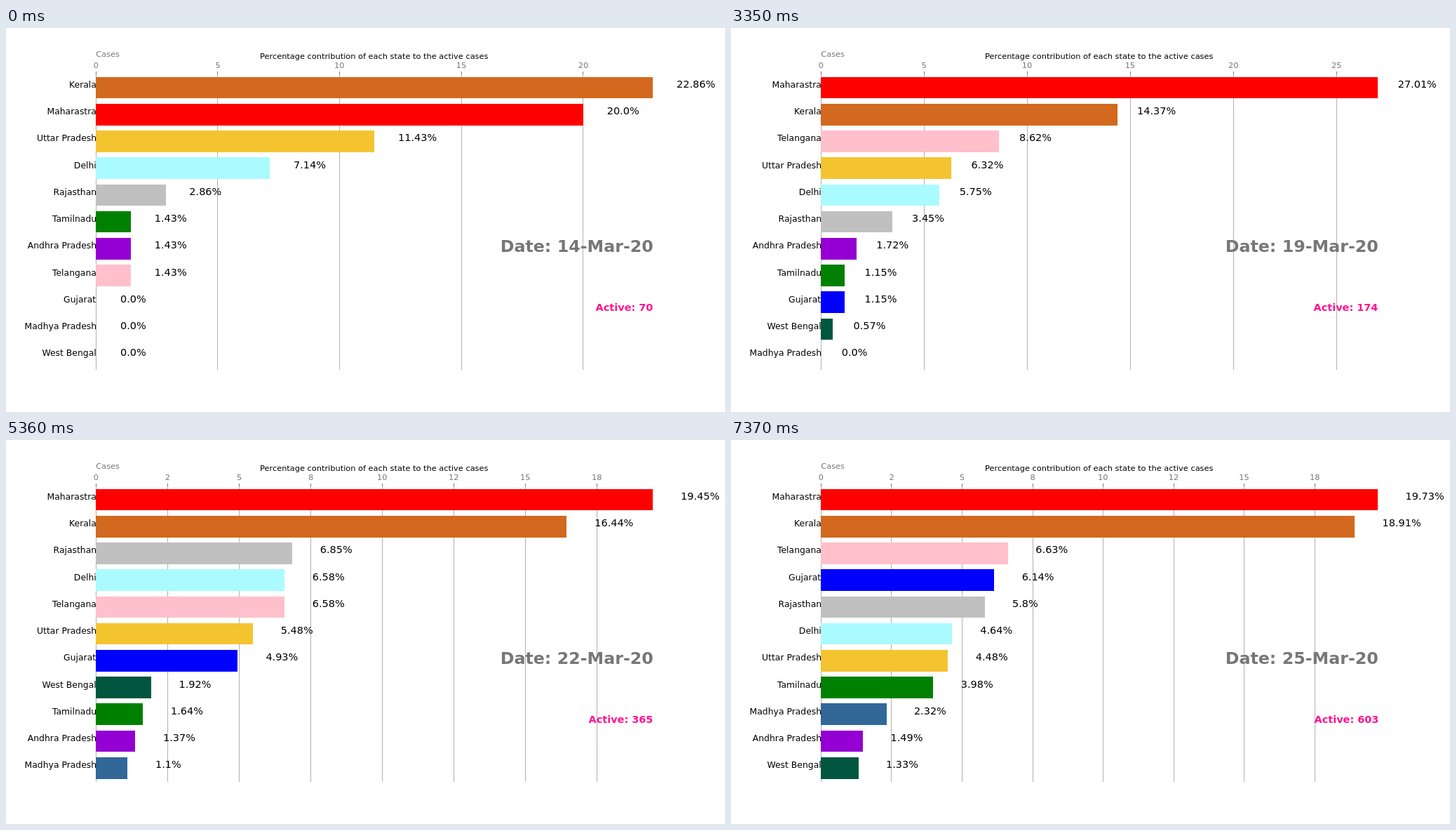
Write an HTML page with a canvas that moves like this. It is 1025 px wide and 547 px high and loops after 8 s.

```html
<!DOCTYPE html>
<html lang="en">
<head>
<meta charset="utf-8">
<title>Active cases by state</title>
<style>
  html, body { margin: 0; width: 100%; height: 100%; overflow: hidden; background: #fff; }
  canvas { display: block; }
</style>
</head>
<body>
<canvas id="chart" width="1025" height="547"></canvas>
<script>
const ctx = document.getElementById('chart').getContext('2d');

const DAY_MS = 670, LOOP_MS = 8000, FIRST_DAY = 14;
const LEFT = 128.3, RIGHT = 922.3, TOP = 65.7, BOTTOM = 486.9;
const FIRST_ROW = 85, ROW_STEP = 38.22, BAR_HEIGHT = 30.6;
const GREY = '#777777';

// Active cases per day, listed in the ranking order of the first day.
const states = [
  ['Kerala', '#d2691e', [16, 21, 20, 24, 24, 25, 25, 49, 60, 92, 91, 114]],
  ['Maharastra', '#ff0000', [14, 32, 32, 40, 41, 47, 49, 63, 71, 95, 97, 119]],
  ['Uttar Pradesh', '#f4c430', [8, 9, 9, 10, 11, 11, 14, 19, 20, 23, 24, 27]],
  ['Delhi', '#aafbff', [5, 4, 4, 5, 7, 10, 14, 21, 24, 24, 23, 28]],
  ['Rajasthan', '#c0c0c0', [2, 1, 1, 1, 1, 6, 14, 21, 25, 29, 29, 35]],
  ['Tamilnadu', '#008000', [1, 1, 0, 0, 0, 2, 2, 5, 6, 11, 14, 24]],
  ['Andhra Pradesh', '#9400d3', [1, 1, 1, 1, 1, 3, 3, 5, 5, 7, 8, 9]],
  ['Telangana', '#ffc0cb', [1, 2, 2, 4, 8, 15, 16, 20, 24, 32, 34, 40]],
  ['Gujarat', '#0000ff', [0, 0, 0, 0, 0, 2, 5, 14, 18, 29, 32, 37]],
  ['Madhya Pradesh', '#316898', [0, 0, 0, 0, 0, 0, 4, 4, 4, 6, 7, 14]],
  ['West Bengal', '#00563f', [0, 0, 0, 1, 1, 1, 2, 4, 7, 6, 7, 8]],
];
const totals = [70, 93, 95, 116, 134, 174, 219, 307, 365, 459, 486, 603];

// Equal values keep their order from the day before.
let ranking = states;
const days = totals.map((total, day) => {
  ranking = [...ranking].sort((a, b) => b[2][day] - a[2][day]);
  const rows = ranking.map(([name, color, counts]) =>
    ({ name, color, share: +(100 * counts[day] / total).toFixed(2) }));
  return { date: `Date: ${FIRST_DAY + day}-Mar-20`, total, rows };
});

// Aligns the visible ink of the text: 0 = left, 0.5 = centre, 1 = right.
function label(text, x, baseline, size, align = 0, color = '#000', weight = 'normal') {
  ctx.font = `${weight} ${size}px "DejaVu Sans", sans-serif`;
  ctx.fillStyle = color;
  const ink = ctx.measureText(text);
  const left = -ink.actualBoundingBoxLeft;
  const width = ink.actualBoundingBoxRight - left;
  ctx.fillText(text, x - left - width * align, baseline);
}

function rect(x0, y0, x1, y1, color) {
  const [l, t, r, b] = [x0, y0, x1, y1].map(Math.round);
  ctx.fillStyle = color;
  ctx.fillRect(l, t, r - l, b - t);
}

const roundHalfEven = v => v % 1 ? 2 * Math.round(v / 2) : v;
const percent = v => (Number.isInteger(v) ? v.toFixed(1) : v) + '%';

function draw({ date, total, rows }) {
  ctx.fillStyle = '#fff';
  ctx.fillRect(0, 0, 1025, 547);

  const max = rows[0].share;
  const toX = v => LEFT + (RIGHT - LEFT) * v / max;

  const step = max > 22.5 ? 5 : 2.5;
  for (let v = 0; v <= max; v += step) {
    const x = Math.floor(toX(v));
    rect(x, TOP - 4, x + 1, TOP, GREY);
    rect(x, TOP, x + 1, BOTTOM, '#b0b0b0');
    label(roundHalfEven(v), toX(v), 57.3, 11.36, 0.5, GREY);
  }

  rows.forEach(({ name, color, share }, i) => {
    const y = FIRST_ROW + i * ROW_STEP;
    rect(LEFT, y - BAR_HEIGHT / 2, toX(share), y + BAR_HEIGHT / 2, color);
    label(name, LEFT, y, 12.4, 1);
    label(percent(share), toX(share + 1), y, 14.46);
  });

  label('Cases', LEFT, 40.7, 11.36, 0, GREY);
  label('Percentage contribution of each state to the active cases',
    (LEFT + RIGHT) / 2, 43.6, 11.36, 0.5);
  label(date, RIGHT, 318.7, 23.76, 1, GREY, 'bold');
  label(`Active: ${total}`, RIGHT, 402.8, 14.46, 1, '#ff1493', 'bold');
}

function tick() {
  draw(days[Math.floor(performance.now() % LOOP_MS / DAY_MS)]);
  requestAnimationFrame(tick);
}
tick();
</script>
</body>
</html>
```
